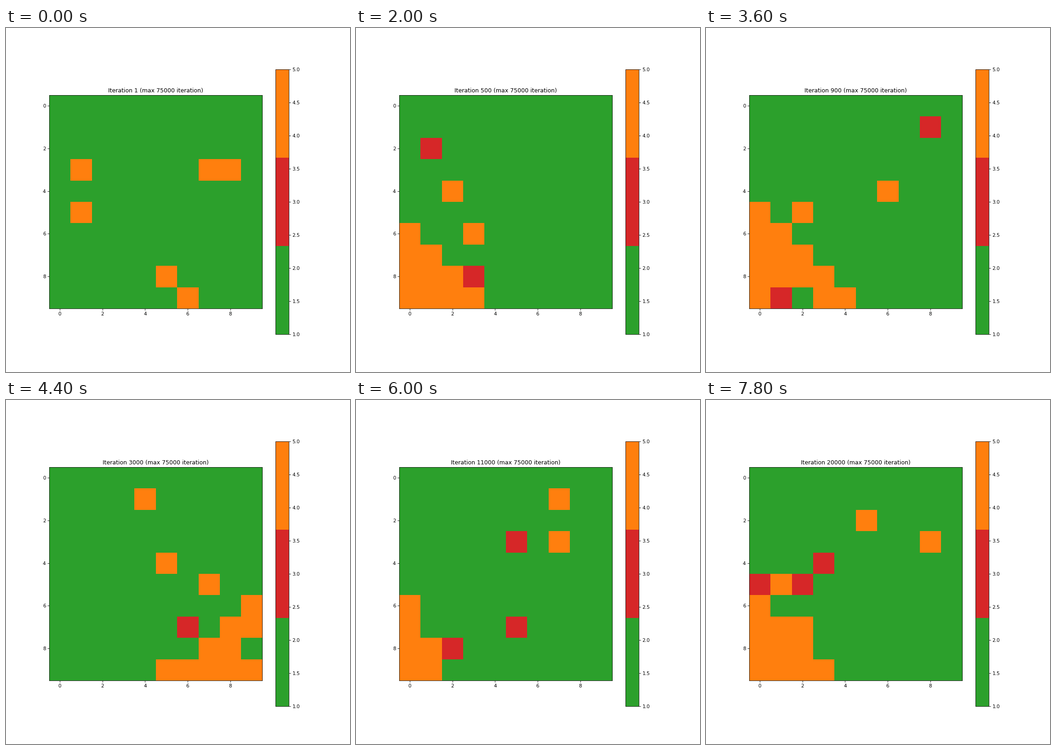
A matplotlib script that plays this animation: 748 by 748 pixels, repeating every 8 s.

```python
import numpy as np
import matplotlib.pyplot as plt
from matplotlib.animation import FuncAnimation
from matplotlib.colors import ListedColormap

INCHES, DPI = 10, 74.8
N, FRAMES, STEP_MS = 10, 40, 200
EMPTY, RED, ORANGE = 1, 3, 5
KEEP = 0.88  # share of the pile that is filled

# A pile leans in a bottom corner and swaps sides; other cells are strays.
STEPS = [0, 5, 14, 22, 27, 34, 39]
SIDE = [9, 0, 0, 9, 0, 9, 0]
WIDTH = [0, 0, 5, 5, 2, 1, 4]
HEIGHT = [1, 1, 5, 3.5, 6, 2, 6]
STRAYS = [6, 10, 1, 3, 3, 2, 3]
REDS = [0, 2, 2, 1, 2, 4, 3]

rows, cols = np.indices((N, N))


def iteration(step):
    if step == 0:
        return 1
    return 50 * step if step <= 20 else 1000 * (step - 19)


def grid(step):
    rng = np.random.default_rng(step)
    side = SIDE[int(np.argmin(np.abs(np.array(STEPS) - step)))]
    width, height, strays, reds = (
        np.interp(step, STEPS, values)
        for values in (WIDTH, HEIGHT, STRAYS, REDS))

    def scatter(count):
        n = round(count)
        return rng.integers(1, N, n), np.abs(side - rng.integers(0, N - 1, n))

    reach = width * (1 - (N - 1 - rows) / height)
    pile = (np.abs(cols - side) < reach) & (rng.random((N, N)) < KEEP)
    cells = np.where(pile, ORANGE, EMPTY)
    cells[scatter(strays)] = ORANGE
    cells[scatter(reds)] = RED
    return cells


fig, ax = plt.subplots(figsize=(INCHES, INCHES), dpi=DPI)
fig.subplots_adjust(left=0.1252)
cmap = ListedColormap(["tab:green", "tab:red", "tab:orange"])
image = ax.imshow(grid(0), cmap=cmap, vmin=EMPTY, vmax=ORANGE)
fig.colorbar(image, ax=ax)
title = ax.set_title("")


def draw(step):
    image.set_data(grid(step))
    title.set_text(f"Iteration {iteration(step)} (max 75000 iteration)")
    return image, title


anim = FuncAnimation(fig, draw, frames=FRAMES, interval=STEP_MS,
                     repeat=True, repeat_delay=0)
plt.show()
```
